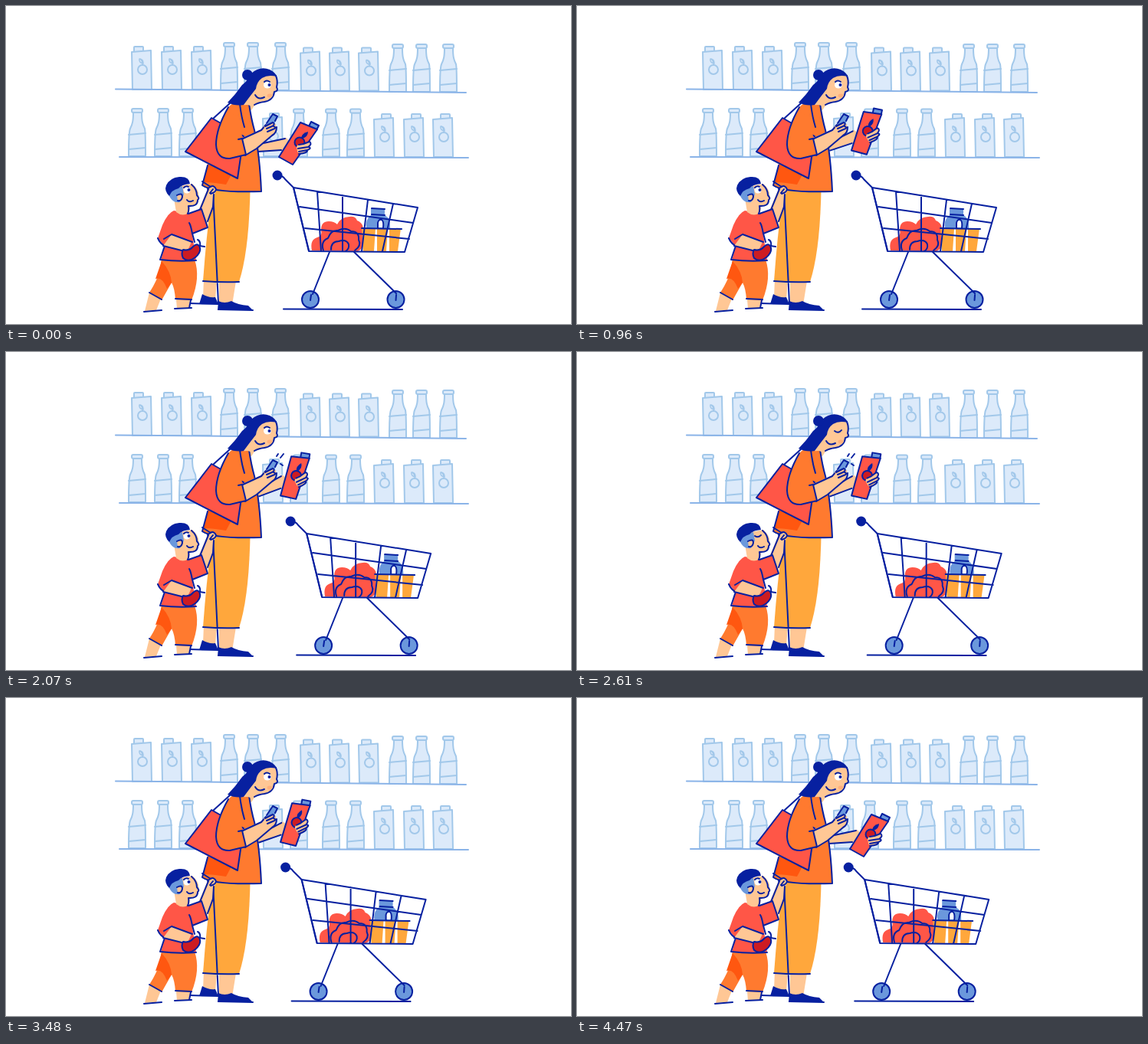
Recreate the animation shown at these times as an HTML page. Size 737 px wide and 415 px high, loop 4500 ms.

```html
<!DOCTYPE html>
<html lang="en">
<head>
<meta charset="utf-8">
<title>Grocery shopping</title>
<style>
  html, body { margin: 0; width: 100%; height: 100%; overflow: hidden; background: #fff; }
  svg { display: block; width: 100%; height: 100%; }
  .ink { stroke: #0720a0; stroke-width: 2; }
  .line { fill: none; stroke: #0720a0; stroke-width: 2; }
  .navy { fill: #0720a0; }
  .skin { fill: #ffc795; }
  .coat { fill: #ff7a2f; }
  .deep { fill: #ff5710; }
  .red { fill: #ff5647; }
  .dark { fill: #cd1c22; }
  .gold { fill: #ffa73c; }
  .blue { fill: #6b98dc; }
  .white { fill: #fff; }
  .stock { fill: #dceafa; stroke: #a2c8ea; stroke-width: 2; }
</style>
</head>
<body>
<svg viewBox="0 0 737 415" stroke-linecap="round" stroke-linejoin="round">
  <defs>
    <g id="bottle" class="stock">
      <path d="M-5-57C-5-46-6-42-9-36Q-11-32-11 0H11Q11-32 10-36C7-42 6-46 6-57Z"/>
      <rect x="-7" y="-62" width="14" height="5" rx="2"/>
      <path d="M-11-28L11-30M-11-9L11-11" fill="none"/>
    </g>
    <g id="pack" class="stock">
      <path d="M-13-49L12-51L13 0H-12Z"/>
      <circle cx="1" cy="-26" r="6"/>
      <path d="M1-32Q2-37-2-40M2-34Q-4-35-3-40Q2-40 2-34" fill="none" stroke-width="1.6"/>
    </g>
  </defs>

  <g id="shelves"></g>
  <path d="M143 108.500Q370 110 600 113M148 197Q380 197 603 198" fill="none" stroke="#8bb4e8" stroke-width="2"/>

  <!-- far arm with the juice carton -->
  <g id="arm">
    <path class="skin" d="M318 178L334 179L366 172L377 187L356 189L320 190Z"/>
    <path class="line" d="M331 180L364 173M329 190L359 188" stroke-width="1.800"/>
    <path class="blue ink" d="M398 151L408 156L405 162L395 157Z" stroke-width="1.600"/>
    <path class="red ink" d="M384 152L406 161L374 207L356 197Z"/>
    <circle class="dark ink" cx="383" cy="178" r="6.500" stroke-width="1.500"/>
    <path class="navy" d="M385 172Q386 166 394 164Q394 171 386 173Z"/>
    <path class="skin" d="M379 184Q381 179 388 180L396 177Q400 179 395 183L397 186L392 191L386 192Q380 193 380 189Z"/>
    <path class="line" d="M382 181L388 180L396 177Q400 180 394 184L381 186M395 184Q399 186 393 188L382 190M393 188Q394 192 382 193" stroke-width="1.500"/>
  </g>

  <!-- woman -->
  <path class="skin" d="M258 356L275 358L273 384L257 380ZM278 358L300 359L295 390H278Z"/>
  <path class="gold" d="M270 238Q262 290 257 359L304 360Q317 320 318.500 240Z"/>
  <path class="line" d="M257 359Q282 361 304 360M270 242Q274 320 277 388"/>
  <path class="navy" d="M256 376Q264 381 273 380L277 389H252ZM277 385Q285 389 294 385Q302 390 316 391L322 397H276Z"/>
  <path class="line" d="M239 388L277 389M277 396L322 397"/>

  <path class="skin" d="M308 118L336 121L326 127L320 136L306 132Z"/>
  <path class="line" d="M270 147L292 127"/>
  <path class="coat" d="M296 127Q288 132 285 142Q276 157 274 175L256 234Q270 244 333 242Q331 190 323 160L317 128Q310 131 305 127Z"/>
  <path class="deep" d="M263 206L294 220L287 233Q269 230 258 230Z"/>
  <path class="line" d="M305 128Q307 145 311 158M317 128Q320 148 324 162Q331 195 333 242Q270 244 256 234L263 208"/>
  <path class="red ink" d="M268 146L310 170L302 225L234 190Z"/>

  <path class="skin" d="M308 172L333 161Q338 153 342 154L352 154Q354 163 348 169L326 186L312 195Z"/>
  <path class="line" d="M309 173L333 162L339 155M353 158Q353 166 347 169L327 186L312 195" stroke-width="1.800"/>
  <path class="coat" d="M287 137Q274 158 274 180Q275 200 292 199L313 194L308 172L306 145Z"/>
  <path class="line" d="M290 132Q274 160 274 181Q275 200 292 199L313 194L308 173L303 174"/>
  <path class="blue" d="M340 154L348 141L354 144L349 157L341 158Z"/>
  <path class="line" d="M340 153L348 141L354 144L351 150" stroke-width="1.400"/>
  <path class="skin" d="M336 157L348 152Q352 153 349 156L352 158L350 162L342 166Z"/>
  <path class="line" d="M338 157L348 152Q352 154 347 157L340 160M349 157Q354 159 348 161L341 164" stroke-width="1.400"/>
  <path id="flash" class="line" d="M353 136L355 133M358 138L362 133M358 146L361 148" stroke-width="1.800"/>

  <path class="skin" d="M320 94L342 85Q353 89 354 100L353 106Q356 110 350 111Q349 123 337 125Q329 126 322 131L312 128Z"/>
  <path class="line" d="M352 91Q355 98 353 106Q356 111 350 112Q349 123 337 125Q329 126 324 129" stroke-width="1.800"/>
  <ellipse cx="344" cy="117" rx="3.500" ry="2.500" fill="#ffb07c"/>
  <path class="navy" d="M320 88Q331 78 344 83Q352 87 353 92Q342 89 334 94Q327 99 326 108Q318 118 310 129Q299 131 289 126Q299 116 308 103Q316 97 317 91Z"/>
  <circle class="navy" cx="315" cy="90" r="7"/>
  <path class="line" d="M325 116Q329 123 337 119" stroke-width="1.600"/>
  <g class="open">
    <ellipse class="white" cx="341" cy="103" rx="5" ry="4.500"/>
    <circle class="navy" cx="343.500" cy="103" r="2"/>
    <path class="line" d="M337 99Q340 96 344 99" stroke-width="1.200"/>
  </g>
  <path class="shut line" d="M336 103Q341 107 345 102" stroke-width="1.300"/>

  <!-- boy -->
  <path class="skin" d="M187 374L202 382L196 397L181 398ZM222 383L242 383L239 394L223 395Z"/>
  <path class="line" d="M180 399L203 397M241 384L239 394M220 395L242 394"/>
  <path class="coat" d="M203 329L246 331Q254 354 242 384L221 383Q220 368 216 361L203 384L187 374Q198 357 201 343Z"/>
  <path class="deep" d="M203 333Q215 346 216 361L210 369Q204 353 195 356Z"/>
  <path class="line" d="M187 374L203 383M221 382L242 383"/>
  <path class="skin" d="M250 269L263 239Q269 231 274 238Q275 243 270 248L270 262L262 286Z"/>
  <path class="line" d="M253 266L264 239M271 246L270 262L263 281M263 239Q270 231 274 239Q274 243 267 245M270 239L266 244" stroke-width="1.700"/>
  <path class="line" d="M256 229L267 236"/>
  <path class="red" d="M219 267Q211 270 204 286L198 303L207 313L202 332L248 332L243 298L263 288L255 265L238 271Z"/>
  <path class="line" d="M198 303Q201 310 207 313L201 331Q225 334 248 332M238 271L255 265L263 289L243 297Q241 286 239 283"/>
  <path class="skin" d="M216 298L242 308L236 321L205 313Z"/>
  <path class="line" d="M216 298L243 308M243 297L246 308M205 313L233 320M206 304L216 298" stroke-width="1.800"/>
  <path class="dark ink" d="M231 318Q239 320 244 314Q249 309 252 313Q256 320 247 328Q238 335 231 329Q228 323 231 318Z" stroke-width="1.400"/>
  <path class="line" d="M253 313L259 314M253 313Q254 307 250 305" stroke-width="2.500"/>
  <path class="skin" d="M219 251L222 269Q231 276 239 269L240 261Q252 262 251 250Q253 241 243 232L222 236Z"/>
  <path class="line" d="M242 233Q249 239 249 247Q253 251 250 253Q250 262 238 261Q239 267 237 271" stroke-width="1.800"/>
  <path class="blue" d="M211 242L230 235L232 246L227 256Q218 258 213 248Z"/>
  <path class="navy" d="M213 248Q206 241 209 234Q214 224 226 223Q239 222 240 232Q229 233 225 238Q216 240 213 248Z"/>
  <path class="skin" d="M223 247Q230 242 230 249Q230 255 224 254Z"/>
  <path class="line" d="M223 247Q230 243 230 249Q229 255 224 254M236 253Q239 257 244 254" stroke-width="1.400"/>
  <g class="boy-open">
    <ellipse class="white" cx="236" cy="240" rx="4.500" ry="4.500"/>
    <circle class="navy" cx="238.500" cy="240" r="2"/>
    <path class="line" d="M232 237Q235 234 238 236" stroke-width="1.200"/>
  </g>
  <path class="boy-shut line" d="M232 240Q236 243 240 239" stroke-width="1.300"/>

  <!-- cart -->
  <g id="cart">
    <path class="red" d="M399 319Q396 305 406 302Q413 300 411 292Q411 281 421 281Q428 281 432 285Q437 275 448 275Q456 274 458 280Q468 284 465 295Q469 303 465 307Q466 318 459 320Z"/>
    <path class="line" d="M414 319Q410 307 420 303Q424 292 433 293Q443 288 450 294Q461 294 460 305Q464 313 455 319M424 318Q424 307 434 307Q444 304 447 311Q448 317 443 320" stroke-width="1.800"/>
    <path class="gold" d="M464 290H482L480 320H466ZM484 290H498L496 320H484ZM500 290H515L511 320H500Z"/>
    <path class="blue" d="M470 290Q468 279 476 273L476 264L494 264L494 273Q502 277 501 290Z"/>
    <path d="M485 289V283Q486 278 490 279Q493 281 492 289" fill="#fff"/>
    <path class="line" d="M477 264L494 265M477 272L494 273M485 289V283Q486 278 490 279Q493 281 492 289M464 290L516 291" stroke-width="2.200"/>
    <path class="line" d="M375 237L537 263L520 321L395 320ZM406 242L411 320M439 247L439 320M472 253L464 320M505 258L491 320M383 262L531 283M390 290Q460 297 526 304"/>
    <path class="line" d="M354 221Q361 221 364 226L375 237L395 319" stroke-width="2.800"/>
    <circle class="navy" cx="354" cy="221" r="6.500"/>
    <path class="line" d="M362 395.500L517 396" stroke-width="3"/>
    <g class="blue ink">
      <circle cx="397" cy="383" r="11"/>
      <circle cx="508.500" cy="383" r="11"/>
    </g>
    <path class="line" d="M422 321L400 376M454 321L509 375" stroke-width="2.800"/>
    <path class="line" d="M398 377L397 384M509 377L508.500 384" stroke-width="8"/>
  </g>
</svg>

<script>
const LOOP = 4500;
const pick = id => document.getElementById(id);
const [shelves, arm, cart, flash] = ['shelves', 'arm', 'cart', 'flash'].map(pick);

// Each group: shape, base line, centre positions, optional cap offset
const stock = [
  ['pack', 109, [177, 216, 255], -4],
  ['bottle', 110, [291, 322, 358]],
  ['pack', 110.5, [397, 435, 473], -3],
  ['bottle', 112, [511, 542, 577]],
  ['bottle', 196, [171, 205, 237]],
  ['pack', 196, [348], 2],
  ['bottle', 196.5, [382, 424, 456]],
  ['pack', 197, [493, 532, 570], 3]
];
shelves.innerHTML = stock.map(([shape, y, xs, cap]) => xs.map(x =>
  (shape === 'pack' ? `<rect class="stock" x="${x + cap - 6}" y="${y - 56}" width="12" height="8" rx="1"/>` : '') +
  `<use href="#${shape}" x="${x}" y="${y}"/>`).join('')).join('');

function smooth(from, to, v) {
  const u = Math.min(1, Math.max(0, (v - from) / (to - from)));
  return u * u * (3 - 2 * u);
}

function show(selector, on) {
  document.querySelector(selector).style.display = on ? '' : 'none';
}

function draw(now) {
  const t = now % LOOP;
  const during = (from, to) => t > from && t < to;
  const swing = Math.sin(Math.PI * t / LOOP);
  const blink = during(2540, 2740);
  const boyBlink = blink || during(1560, 1740);
  cart.setAttribute('transform', `translate(${17.3 * swing ** 1.15} 0)`);
  arm.setAttribute('transform', `rotate(${-16.5 * smooth(.15, .75, swing)} 324 185)`);
  show('#flash', during(1300, 2860));
  show('.open', !blink);
  show('.shut', blink);
  show('.boy-open', !boyBlink);
  show('.boy-shut', boyBlink);
  requestAnimationFrame(draw);
}
draw(performance.now());
</script>
</body>
</html>
```
